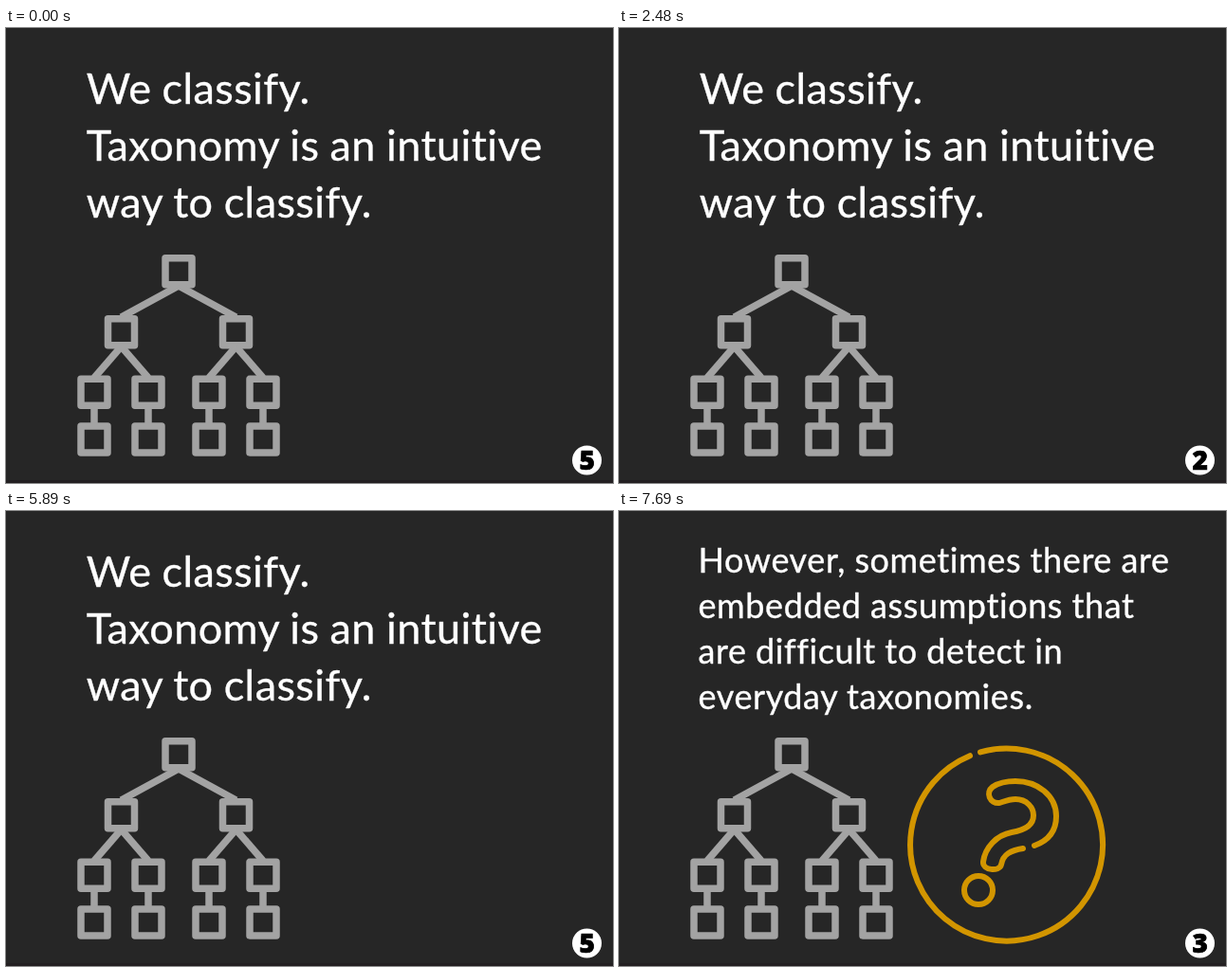
An HTML page for the animation above (8000 ms loop, 640 by 480 pixels).

```html
<!DOCTYPE html>
<html lang="en">
<head>
<meta charset="utf-8">
<title>Classify</title>
<style>
  html, body { margin: 0; width: 100%; height: 100%; overflow: hidden; background: #262626; }
  svg { display: block; width: 100vw; height: 100vh; }
  text { font-family: Lato, Carlito, sans-serif; fill: #fff; stroke: #fff; stroke-width: .4; }
  #intro { font-size: 45px; letter-spacing: .43px; word-spacing: -.8px; }
  #doubt { font-size: 36px; letter-spacing: .6px; word-spacing: -.3px; }
  #tree { fill: none; stroke: #a3a3a3; stroke-width: 7.5; stroke-linejoin: round; }
  #question { fill: none; stroke: #d29500; stroke-width: 6; stroke-linecap: round; stroke-linejoin: round; }
  #count { font: 800 28px "Open Sans", sans-serif; fill: #000; stroke: #000; stroke-width: .7; text-anchor: middle; }
</style>
</head>
<body>
<svg viewBox="0 0 640 480">
  <rect width="640" height="480" fill="#262626"/>
  <rect y="477" width="640" height="3" fill="#231f21"/>
  <g id="intro"></g>
  <g id="doubt"></g>
  <g id="tree"></g>
  <g id="question">
    <path d="M381 254.4A101.5 101.5 0 1 1 370 258.2"/>
    <path d="M438 353C452 348 461 338 461 322C461 300 441 285 418 285C408 285 400 287 394 291
      C386 297 391 309 401 308C407 306 412 304 418 304C430 304 437 313 437 321
      C437 332 426 337 414 339C398 342 386 355 384 370C383 379 401 381 403 373C405 362 413 358 426 356"/>
    <circle cx="379" cy="400" r="15"/>
  </g>
  <circle cx="612.5" cy="456" r="15.5" fill="#fff"/>
  <text id="count" x="612.7" y="466.2"></text>
</svg>
<script>
const LOOP = 8000;
const SCENE_CHANGE = 6090;
const COUNTS = [[0, 5], [540, 4], [1540, 3], [2480, 2], [3480, 1], [4480, 0], [5890, 5], [6690, 4], [7690, 3]];

const byId = id => document.getElementById(id);

function add(parent, tag, attrs, content = "") {
  const el = document.createElementNS("http://www.w3.org/2000/svg", tag);
  for (const name in attrs) el.setAttribute(name, attrs[name]);
  el.textContent = content;
  parent.appendChild(el);
}

function addLines(id, x, baseline, leading, lines) {
  lines.forEach((line, i) => add(byId(id), "text", { x, y: baseline + i * leading }, line));
}

function drawTree() {
  const tree = byId("tree");
  const box = (x, y) => add(tree, "rect", { x: x - 14, y: y - 14, width: 28, height: 28 });
  const link = (x1, y1, x2, y2) => add(tree, "path", { d: `M${x1} ${y1}L${x2} ${y2}` });

  box(182, 256.8);
  for (const [branch, leaves] of [[121.5, [93, 150]], [242.5, [214, 271]]]) {
    link(182, 272, branch, 305);
    box(branch, 320.8);
    for (const leaf of leaves) {
      link(branch, 336, leaf, 369);
      link(leaf, 400, leaf, 418);
      box(leaf, 384.3);
      box(leaf, 434);
    }
  }
}

function render(time) {
  const t = time % LOOP;
  const doubting = t >= SCENE_CHANGE;
  const show = (id, on) => byId(id).setAttribute("visibility", on ? "visible" : "hidden");
  show("intro", !doubting);
  show("doubt", doubting);
  show("question", doubting);
  byId("count").textContent = COUNTS.filter(([start]) => t >= start).pop()[1];
}

addLines("intro", 84.7, 80, 60, ["We classify.", "Taxonomy is an intuitive", "way to classify."]);
addLines("doubt", 83.5, 65, 48, [
  "However, sometimes there are",
  "embedded assumptions that",
  "are difficult to detect in",
  "everyday taxonomies."
]);
drawTree();

const began = performance.now();
function tick() {
  render(performance.now() - began);
  requestAnimationFrame(tick);
}
tick();
</script>
</body>
</html>
```
